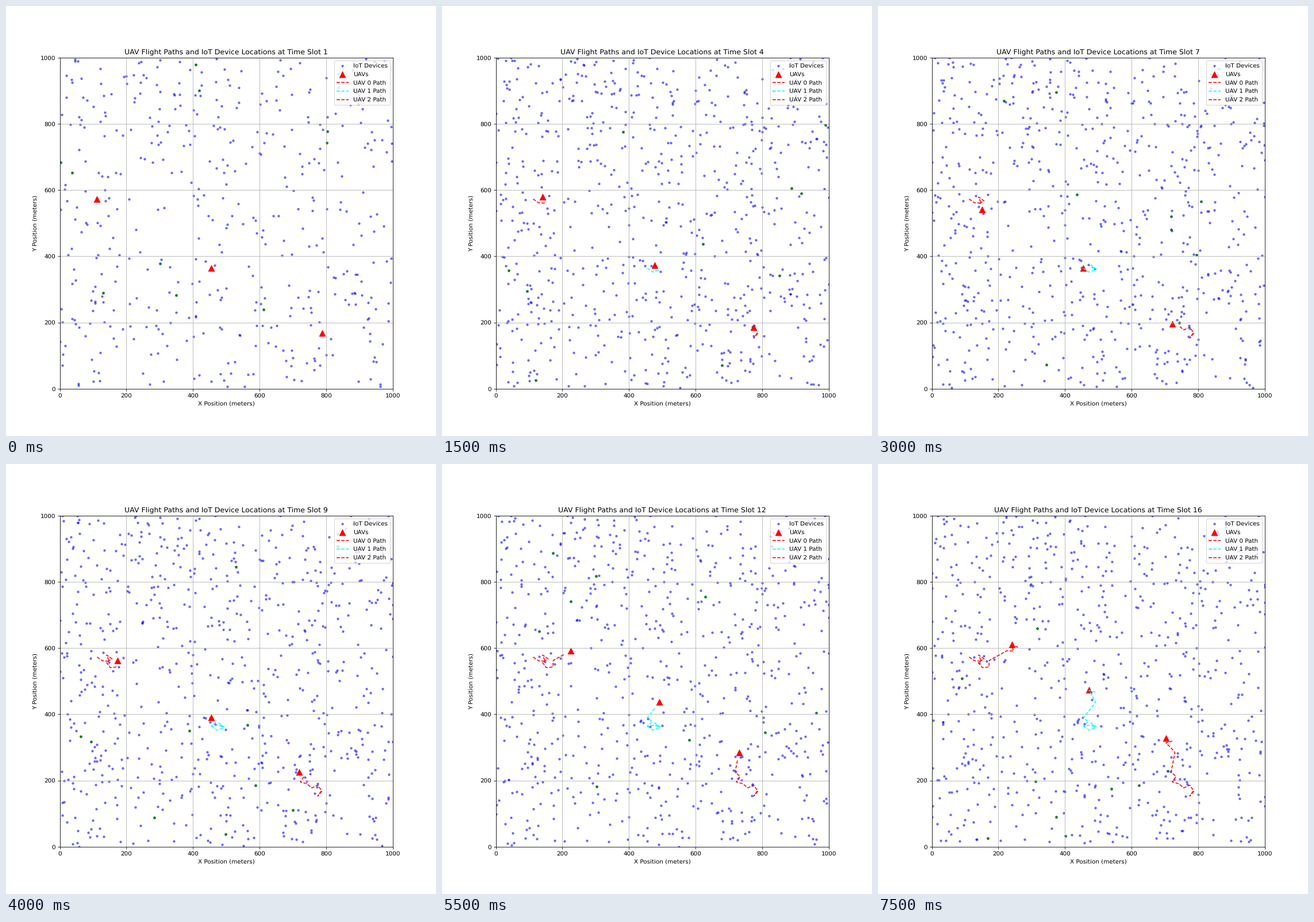
These frames come from a looping animation (748 by 748 pixels, 8000 ms). A matplotlib script:

```python
import numpy as np
import matplotlib.pyplot as plt
from matplotlib.animation import FuncAnimation

SLOTS = 16
SLOT_MS = 500
AREA = 1000        # side of the field, metres
STEP = 20          # UAV travel per slot, metres
DEVICES = 720
DRIFT = 3.5        # device drift per slot, metres
SEED = 12

# Colour, start point and heading in degrees for each hop
FLIGHTS = [
    ("red", (112, 573),
     [-35, -3, 113, -35, 212, -54, 6, 87, 29, 28, 30, -3, 104, -24, 156]),
    ("cyan", (455, 364),
     [-36, 17, 130, -36, 164, 189, 40, 140, 50, 52, 55, 118, 120, -15, 160]),
    ("red", (787, 168),
     [230, 56, 123, 205, 140, 165, 55, 138, 79, 79, 79, 130, 136, 16, 157]),
]


def fly(start, headings):
    """Waypoints reached by equal hops along the headings."""
    a = np.radians(headings)
    hops = STEP * np.column_stack([np.cos(a), np.sin(a)])
    return np.vstack([start, start + hops.cumsum(axis=0)])


def drift_devices():
    """Positions of all devices, shaped (slot, device, xy)."""
    rng = np.random.default_rng(SEED)
    homes = rng.uniform(0, AREA, (DEVICES, 2))
    steps = rng.normal(0, DRIFT, (SLOTS, DEVICES, 2))
    steps[0] = 0
    return np.clip(homes + steps.cumsum(axis=0), 0, AREA)


def active_devices(i):
    return tracks[i, :min(DEVICES, 450 + 90 * i)]


def served_devices(i):
    rng = np.random.default_rng(SEED + i)
    return rng.choice(active_devices(i), rng.integers(9, 11), replace=False)


routes = np.array([fly(start, headings) for _, start, headings in FLIGHTS])
tracks = drift_devices()

plt.rcParams["text.hinting"] = "none"
fig, ax = plt.subplots(figsize=(10, 10), dpi=74.8)
devices = ax.scatter([], [], s=10, c="blue", alpha=0.5, label="IoT Devices")
uavs = ax.scatter([], [], s=100, c="red", marker="^", label="UAVs")
served = ax.scatter([], [], s=20, c="green", marker="*")
trails = [ax.plot([], [], "--", color=color, label=f"UAV {n} Path")[0]
          for n, (color, *_) in enumerate(FLIGHTS)]

ax.set_xlim(0, AREA)
ax.set_ylim(0, AREA)
ax.set_xlabel("X Position (meters)")
ax.set_ylabel("Y Position (meters)")
ax.grid(True)
ax.legend(loc="upper right")


def update(i):
    title = ax.set_title(
        f"UAV Flight Paths and IoT Device Locations at Time Slot {i + 1}")
    devices.set_offsets(active_devices(i))
    served.set_offsets(served_devices(i))
    uavs.set_offsets(routes[:, i])
    # Each trail ends at the previous slot
    for trail, route in zip(trails, routes):
        trail.set_data(*route[:i].T)
    return [title, devices, served, uavs, *trails]


anim = FuncAnimation(fig, update, frames=SLOTS, interval=SLOT_MS,
                     repeat=True, repeat_delay=0)
plt.show()
```
